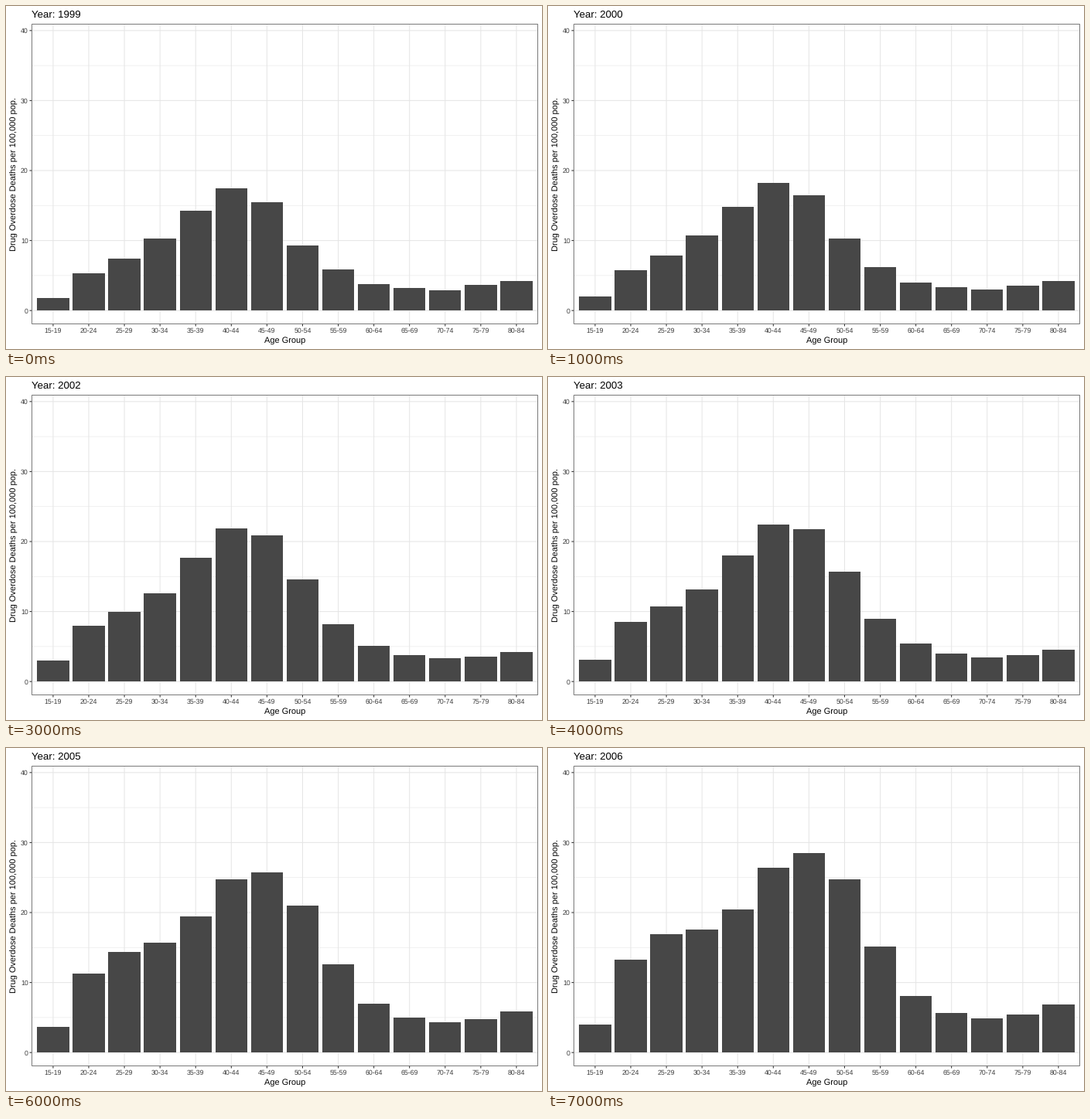
A matplotlib script that plays this animation: 693x444 px, repeating every 8000 ms.

```python
import matplotlib.pyplot as plt
import numpy as np
from matplotlib.animation import FuncAnimation
from matplotlib.patches import Rectangle

W, H, DPI = 693, 444, 100
PX = 72 / DPI  # points per pixel
LEFT, RIGHT, TOP, BOTTOM = 33.5, 687.5, 23.5, 411.5
ZERO, UNIT = 394.0, 9.06  # baseline and pixels per death
STEP = 46.08
DARK, GRID, BORDER, TICK, TICK_TEXT = "#474747", "#e6e6e6", "#7a7a7a", "#2e2e2e", "#3d3d3d"

FIRST, YEARS = 1999, 8
EASE = 1.6  # growth speeds up between key years
AGES = [f"{a}-{a + 4}" for a in range(15, 85, 5)]
KEY_RATES = {
    1999: [1.8, 5.3, 7.4, 10.3, 14.2, 17.4, 15.5, 9.3, 5.8, 3.8, 3.2, 2.9, 3.6, 4.2],
    2002: [3.0, 7.9, 9.9, 12.6, 17.7, 21.9, 20.9, 14.6, 8.2, 5.1, 3.8, 3.3, 3.5, 4.2],
    2006: [4.0, 13.2, 16.9, 17.5, 20.4, 26.4, 28.5, 24.7, 15.1, 8.1, 5.6, 4.9, 5.4, 6.8],
}

plt.rcParams["font.family"] = "Liberation Sans"
plt.rcParams["text.hinting"] = "none"

fig = plt.figure(figsize=(W / DPI, H / DPI), dpi=DPI, facecolor="white")
ax = fig.add_axes([0, 0, 1, 1])
ax.set_xlim(0, W)
ax.set_ylim(H, 0)
ax.axis("off")


def rates_for(year):
    """Blend the two key years around the given year."""
    start = max(k for k in KEY_RATES if k <= year)
    end = min(k for k in KEY_RATES if k >= year)
    t = ((year - start) / max(end - start, 1)) ** EASE
    return (1 - t) * np.array(KEY_RATES[start]) + t * np.array(KEY_RATES[end])


def line(x0, y0, x1, y1, color, width=1.07):
    ax.plot([x0, x1], [y0, y1], color=color, lw=width * PX, zorder=1,
            solid_capstyle="butt", snap=False)


def text(x, y, s, size, color="black", **kw):
    return ax.text(x, y, s, fontsize=size * PX, color=color, va="baseline", **kw)


# Horizontal grid and value axis
for value in range(0, 41, 5):
    y = ZERO - value * UNIT + 0.2
    major = value % 10 == 0
    line(LEFT, y, RIGHT, y, GRID, 1.07 if major else 0.53)
    if major:
        line(LEFT - 3, y, LEFT, y, TICK)
        text(28.6, y + 3.3, str(value), 8.8, TICK_TEXT, ha="right")

# Vertical grid, age axis and bars
bars = []
for i, age in enumerate(AGES):
    x = 60.9 + i * STEP
    line(x, TOP, x, BOTTOM, GRID)
    line(x, BOTTOM, x, BOTTOM + 3, TICK)
    text(x, 423, age, 8.8, TICK_TEXT, ha="center")
    x0, x1 = round(40.2 + i * STEP), round(81.6 + i * STEP)
    bar = Rectangle((x0, ZERO), x1 - x0, 0, fc=DARK, lw=0, zorder=2,
                    antialiased=False)
    bars.append(ax.add_patch(bar))

ax.add_patch(Rectangle((LEFT, TOP), RIGHT - LEFT, BOTTOM - TOP, fill=False,
                       ec=BORDER, lw=PX, zorder=3, snap=False))
text(360.5, 436, "Age Group", 11, ha="center")
text(13.5, 217.5, "Drug Overdose Deaths per 100,000 pop.", 11, ha="center",
     rotation=90, rotation_mode="anchor")
title = text(33, 15, "", 13.2, ha="left")


def draw(frame):
    year = FIRST + frame
    title.set_text(f"Year: {year}")
    for bar, rate in zip(bars, rates_for(year)):
        bar.set_height(-round(rate * UNIT))
    return [title, *bars]


anim = FuncAnimation(fig, draw, frames=YEARS, interval=1000, repeat=True,
                     repeat_delay=0, blit=False)
plt.show()
```
